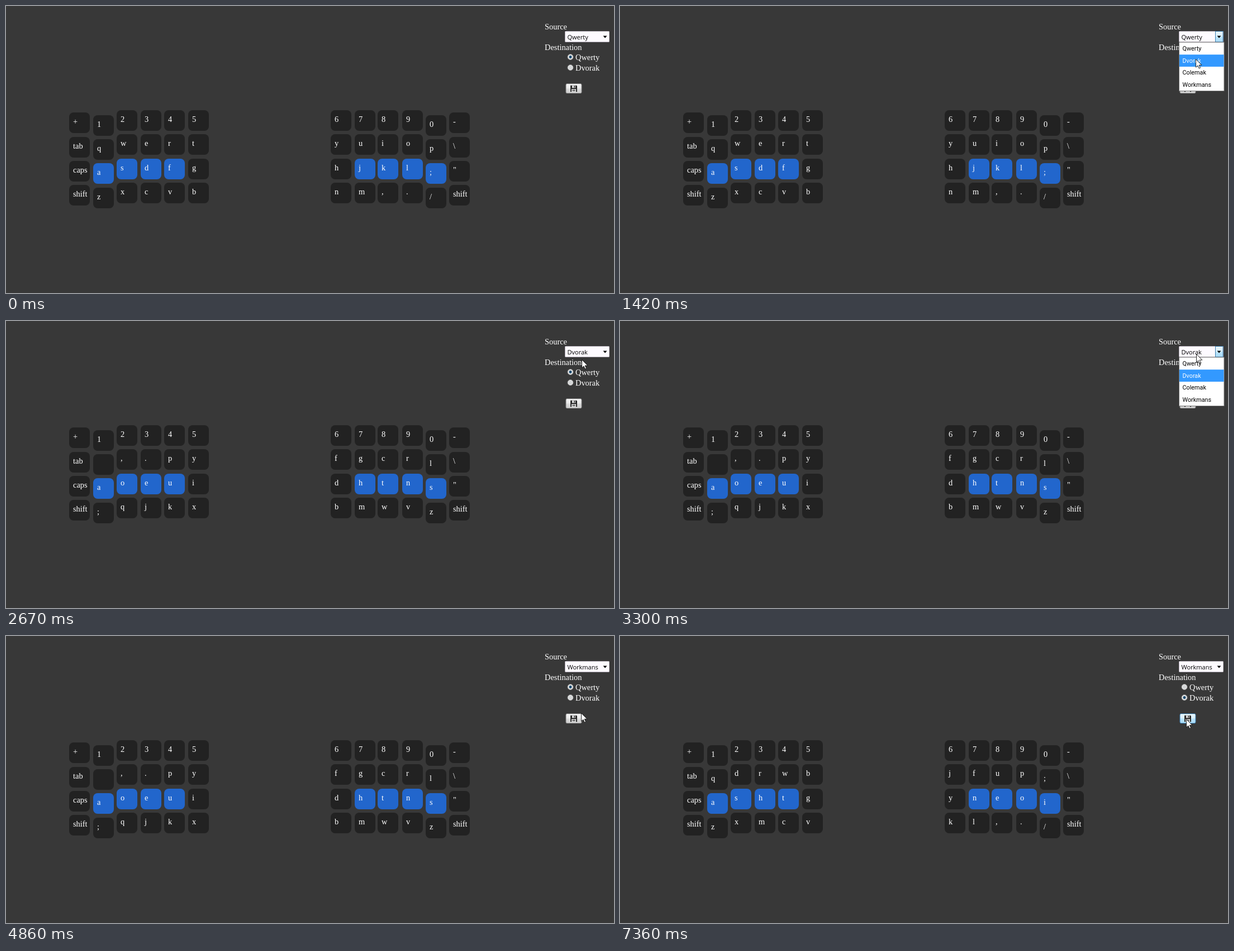
Write an HTML page that moves like this. It is 1088 px wide and 515 px high and loops after 8 s.

```html
<!DOCTYPE html>
<html lang="en">
<head>
<meta charset="utf-8">
<title>Keyboard layouts</title>
<style>
  html, body { margin: 0; width: 100%; height: 100%; overflow: hidden; background: #383838; }
  svg { display: block; }
  text { font: 14.4px "Liberation Serif", "Times New Roman", serif; fill: #fff; white-space: pre; }
  .value { font: 11px "Open Sans", sans-serif; fill: #000; }
  .item { font: 10.8px Roboto, sans-serif; fill: #000; }
  .item.on { fill: #fff; }
</style>
</head>
<body>
<svg id="stage" width="1088" height="515" viewBox="0 0 1088 515">
  <defs>
    <linearGradient id="gray" x2="0" y2="1">
      <stop offset="0" stop-color="#f4f4f4"/><stop offset=".5" stop-color="#e9e9e9"/>
      <stop offset=".5" stop-color="#dcdcdc"/><stop offset="1" stop-color="#cecece"/>
    </linearGradient>
    <linearGradient id="blue" x2="0" y2="1">
      <stop offset="0" stop-color="#eaf6fd"/><stop offset=".5" stop-color="#d8effc"/>
      <stop offset=".5" stop-color="#bee6fd"/><stop offset="1" stop-color="#a7d9f5"/>
    </linearGradient>
  </defs>
</svg>
<script>
const LOOP = 8000;
const NAMES = ["Qwerty", "Dvorak", "Colemak", "Workmans"];
const LAYOUTS = {
  Qwerty: ["qwertyuiop", "asdfghjkl;", "zxcvbnm,./"],
  Dvorak: [" ,.pyfgcrl", "aoeuidhtns", ";qjkxbmwvz"],
  Workmans: ["qdrwbjfup;", "ashtgyneoi", "zxmcvkl,./"]
};
const COLUMNS = [113, 156, 198, 241, 283, 326, 581, 624, 665, 709, 751, 793];
const EDGES = [["+", "tab", "caps", "shift"], ["-", "\\", "\"", "shift"]];
const ROW = 43.4, ITEM = 21.7, LIST_TOP = 65.5;

// Pointer moves: start, end, number of steps, first and last tip position
const MOVES = [
  [180, 640, 4, [989, 82], [1035, 64]],
  [970, 1420, 4, [1035, 64], [1030, 95]],
  [1900, 2070, 2, [1028, 96], [1028, 93]],
  [2370, 2820, 4, [1029, 88], [1031, 59]],
  [3300, 3910, 5, [1031, 59], [1030, 110]],
  [4390, 4540, 2, [1030, 132], [1030, 143]],
  [4860, 5480, 5, [1029, 138], [1015, 104]],
  [5790, 5790, 1, [1016, 107], [1016, 107]],
  [6570, 7360, 6, [1016, 107], [1013, 149]]
];
// Interface changes
const EVENTS = [
  [0, { value: "Qwerty", keys: "Qwerty", dest: 0, open: false }],
  [970, { open: true }],
  [1900, { open: false, value: "Dvorak" }],
  [2070, { keys: "Dvorak" }],
  [3300, { open: true }],
  [4860, { open: false, value: "Workmans" }],
  [5015, { keys: "Workmans" }],
  [6570, { dest: 1 }]
];

const stage = document.getElementById("stage");

function add(tag, attrs, parent = stage) {
  const el = document.createElementNS("http://www.w3.org/2000/svg", tag);
  return parent.appendChild(set(el, attrs));
}
function set(el, attrs) {
  for (const k in attrs) el.setAttribute(k, attrs[k]);
  return el;
}
function box(x, y, width, height, fill, more, parent) {
  return add("rect", { x, y, width, height, fill, ...more }, parent);
}
function label(x, y, text, cls = "", parent) {
  const el = add("text", { x, y, class: cls }, parent);
  el.textContent = text;
  return el;
}
function show(el, on) {
  el.setAttribute("visibility", on ? "visible" : "hidden");
}

const letters = [[], [], []];
COLUMNS.forEach((x, col) => {
  const edge = col % 11 === 0, i = col - 1;
  const top = edge ? 191.2 : col === 1 || col === 10 ? 195.6 : 187;
  for (let row = 0; row < 4; row++) {
    const y = Math.round(top + row * ROW);
    const home = row === 2 && !edge && i !== 4 && i !== 5;
    box(x, y, 37, 37, home ? "#2266cc" : "#222", { rx: 8 });
    const text = edge ? EDGES[col ? 1 : 0][row] : row ? "" : col % 10;
    const el = label(x + 7, y + 21, text);
    if (!edge && row) letters[row - 1][i] = el;
  }
});

label(964, 42, "Source");
label(964, 79, "Destination");

const radios = ["Qwerty", "Dvorak"].map((name, i) => {
  const cx = 1010, cy = 91.5 + i * 19;
  label(1019, 97 + i * 19, name);
  return {
    ring: add("circle", { cx, cy, r: 5 }),
    inner: add("circle", { cx, cy, r: 3.4 }),
    dot: add("circle", { cx, cy, r: 2.4, fill: "#174a70" })
  };
});

const button = box(1002, 139.5, 28, 17, "url(#gray)", { rx: 2 });
add("path", { d: "M1010 142.5h11l1 1v10.500h-12z", fill: "#2b2b2b" });
box(1013, 142.5, 6, 4.500, "#ddd");
box(1016.5, 143, 1.500, 3.500, "#2b2b2b");
box(1012, 149, 8, 5, "#ddd");
box(1013.5, 150, 5, 3, "#777");

box(1000.5, 45.5, 79, 19, "#fdfaff", { stroke: "#b9b2bd", rx: 1 });
const value = label(1004.5, 59.5, "", "value");
const arrowBox = box(1065.5, 45.5, 13.5, 19, "url(#blue)", { stroke: "#3c7fb1" });
add("path", { d: "M1068.500 53.500h7l-3.500 4z", fill: "#000" });

const list = add("g", {});
box(1000.5, LIST_TOP - .5, 80.500, 87.500, "#fff", { stroke: "#707070" }, list);
const bar = box(1001, 0, 79.5, 21.7, "#3399ff", {}, list);
const items = NAMES.map((name, i) =>
  label(1006.5, Math.round(80 + i * ITEM), name, "item", list));

const pointer = add("path", {
  d: "M0 0V14.500L3.400 11.400L5.700 16.500L8 15.500L5.700 10.500H10.400Z",
  fill: "#fff", stroke: "#111", "stroke-width": .9
});

function pointerAt(t) {
  let tip = null;
  for (const [start, end, steps, from, to] of MOVES) {
    if (t < start) break;
    const last = Math.max(1, steps - 1);
    const step = end > start ? Math.floor((t - start + 4) / (end - start) * last) : last;
    const k = Math.min(1, step / last);
    tip = from.map((v, i) => Math.round(v + (to[i] - v) * k));
  }
  return tip;
}

function draw(t) {
  const state = Object.assign({}, ...EVENTS.filter(e => e[0] <= t).map(e => e[1]));
  const tip = pointerAt(t);
  const [x, y] = tip || [0, 0];
  const over = (top, bottom) => x >= 1001 && y >= top && y < bottom;
  const free = !state.open;

  value.textContent = state.value;
  show(arrowBox, state.open || over(45, 66));

  letters.forEach((row, r) => row.forEach((el, i) => {
    el.textContent = LAYOUTS[state.keys][r][i];
  }));

  radios.forEach((radio, i) => {
    const hot = free && over(83 + i * 19, 102 + i * 19);
    set(radio.ring, { fill: hot ? "#dff3fd" : "#eee", stroke: hot ? "#4c9cc9" : "#8e8f8f" });
    set(radio.inner, { fill: hot ? "#a9def7" : "#d3d5d6" });
    show(radio.dot, state.dest === i);
  });

  const hot = free && over(139, 158);
  set(button, { fill: hot ? "url(#blue)" : "url(#gray)", stroke: hot ? "#3c7fb1" : "#8a8a8a" });

  const picked = y >= 66 ? Math.min(3, Math.floor((y - 66) / ITEM)) : NAMES.indexOf(state.value);
  show(list, state.open);
  set(bar, { y: LIST_TOP + picked * ITEM });
  items.forEach((el, i) => el.classList.toggle("on", i === picked));
  bar.setAttribute("visibility", "inherit");

  show(pointer, tip);
  set(pointer, { transform: `translate(${x + .5} ${y + .5})` });
}

const began = performance.now();
function tick() {
  draw((performance.now() - began) % LOOP);
  requestAnimationFrame(tick);
}
tick();
</script>
</body>
</html>
```
